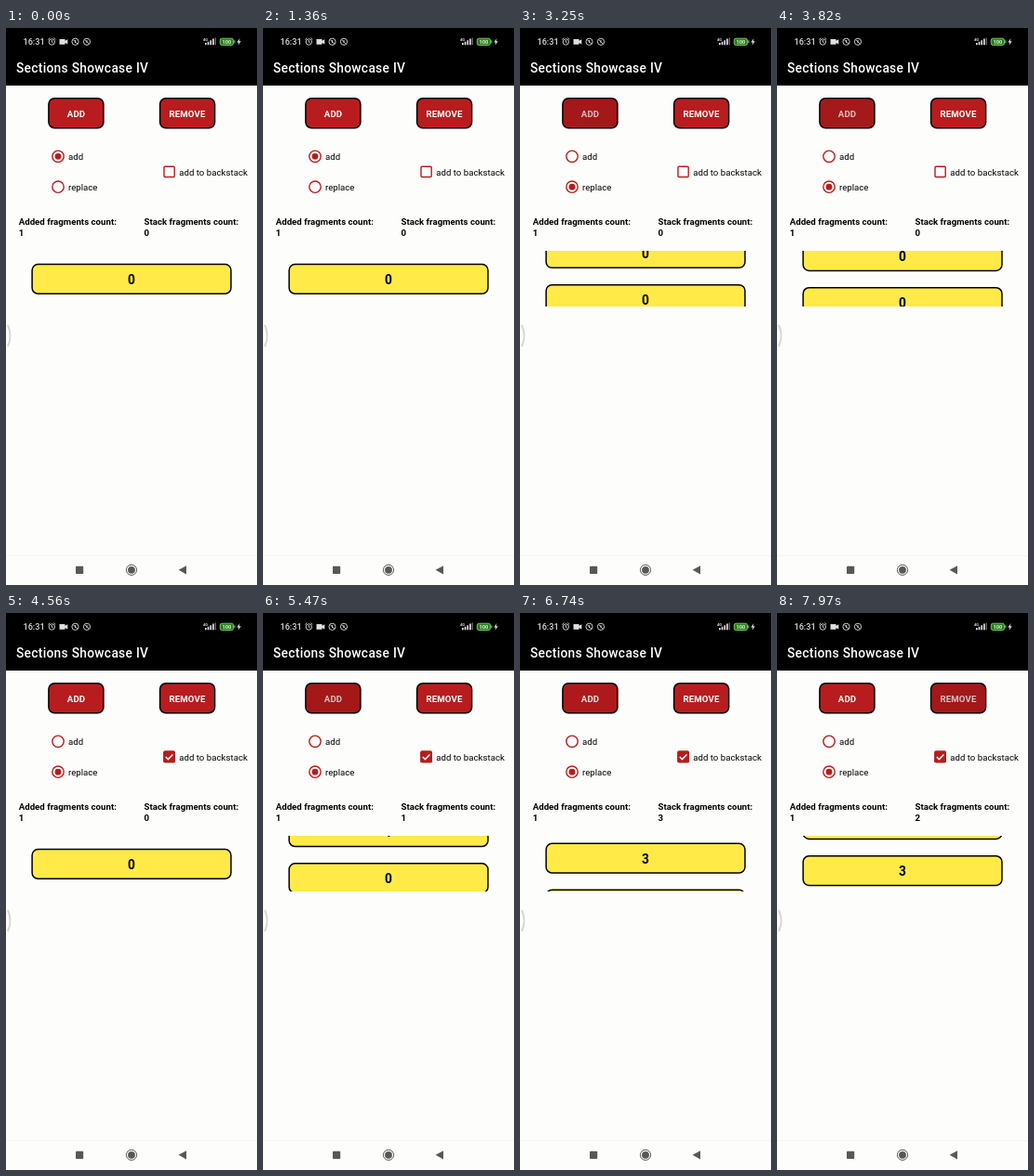
An HTML page for the animation above (8000 ms loop, 270 by 600 pixels).

```html
<!DOCTYPE html>
<html lang="en">
<head>
<meta charset="utf-8">
<title>Sections Showcase IV</title>
<style>
html, body { margin: 0; width: 100%; height: 100%; overflow: hidden; background: #fdfdfc; }
svg { display: block; width: 100%; height: 100%; font-family: Roboto, "Noto Sans", sans-serif; font-size: 9.65px; }
.bold { font-weight: 700; }
.mid { text-anchor: middle; }
.button rect { fill: #b91c1e; stroke: #000; stroke-width: 1.5; }
.button text { fill: #fff; letter-spacing: .15px; }
.button .ripple { fill: #6b1010; stroke: none; }
.bar rect { fill: #ffea48; stroke: #000; stroke-width: 1.5; }
.bar text { font-size: 13.75px; }
.ring { fill: none; stroke: #b71c1c; stroke-width: 1.4; }
.dot { fill: #b71c1c; }
.line { fill: none; stroke: #ccc; stroke-width: 1; }
</style>
</head>
<body>
<svg viewBox="0 0 270 600" preserveAspectRatio="none">
  <defs><clipPath id="box"><rect y="240" width="270" height="60"/></clipPath></defs>
  <rect width="270" height="600" fill="#fdfdfc"/>
  <rect width="270" height="62" fill="#000"/>

  <!-- status bar -->
  <g fill="#dedede">
    <text x="18.5" y="18" font-size="9.1" font-weight="500">16:31</text>
    <g class="line">
      <circle cx="49.3" cy="15" r="3.2"/>
      <path d="M49.3 13v2.2l1.5 .9M45.3 12.5l2-1.9M53.3 12.5l-2-1.9"/>
      <circle cx="74.5" cy="14.8" r="3.6"/><path d="M72.3 12.6l4.4 4.4M74.5 13v3"/>
      <circle cx="87" cy="14.8" r="3.6"/><path d="M84.8 12.6l4.4 4.4M87 13v3"/>
    </g>
    <path d="M57.5 12h6v1.8l2.8-1.6v5.4l-2.8-1.6v1.8h-6z"/>
    <text x="212" y="13.5" font-size="4" font-weight="700">4G</text>
    <path d="M214 16h1.7v2.3H214zM216.7 14.7h1.7v3.6h-1.7zM219.4 13.2h1.7v5.1h-1.7zM222.1 11.6h1.7v6.7h-1.7z"/>
    <path d="M224.7 10.5h1.2v7.8h-1.2z" fill="#777"/>
    <rect x="230.3" y="11.2" width="14.2" height="7.3" rx="2" fill="#2c7a22" stroke="#6ccb4c"/>
    <path d="M245.2 13.3h1.2v3h-1.2z" fill="#6ccb4c"/>
    <text x="237.4" y="17" class="mid bold" font-size="5.8" fill="#d4f8c8">100</text>
    <path d="M251.5 11l-3.1 4.5h2l-.8 3.3 3.2-4.6h-2z"/>
  </g>
  <text x="11" y="48" font-size="13.75" font-weight="500" letter-spacing=".3" fill="#fff">Sections Showcase IV</text>

  <g class="button">
    <rect x="45.9" y="75.8" width="59" height="31.9" rx="6.3"/>
    <text x="75.5" y="95.5" class="mid bold">ADD</text>
    <rect id="addRipple" class="ripple" x="46.6" y="76.5" width="57.6" height="30.5" rx="5.6"/>
  </g>
  <g class="button">
    <rect x="165.6" y="75.8" width="59" height="31.9" rx="6.3"/>
    <text x="195" y="95.5" class="mid bold">REMOVE</text>
    <rect id="removeRipple" class="ripple" x="166.3" y="76.5" width="57.6" height="30.5" rx="5.6"/>
  </g>

  <circle class="ring" cx="56" cy="138.3" r="6.2"/>
  <circle id="addDot" class="dot" cx="56" cy="138.3"/>
  <text x="67" y="142">add</text>
  <circle class="ring" cx="56" cy="171.2" r="6.2"/>
  <circle id="replaceDot" class="dot" cx="56" cy="171.2"/>
  <text x="67" y="175">replace</text>

  <rect class="ring" x="170" y="149.3" width="11.2" height="11.2" rx="1"/>
  <g id="check">
    <rect class="dot" x="169.3" y="148.6" width="12.6" height="12.6" rx="1.5"/>
    <path d="M171.8 155l2.6 2.6 5-5.2" fill="none" stroke="#fff" stroke-width="1.5"/>
  </g>
  <text x="186.2" y="158.5" letter-spacing=".03">add to backstack</text>

  <g class="bold" letter-spacing=".03">
    <text x="13.7" y="212">Added fragments count:</text>
    <text x="13.7" y="223.5">1</text>
    <text x="148.5" y="212">Stack fragments count:</text>
    <text x="148.5" y="223.5" id="stack">0</text>
  </g>

  <g clip-path="url(#box)">
    <g id="oldBar" class="bar">
      <rect x="28.1" y="254.6" width="213.9" height="31.6" rx="6.3"/>
      <text x="135" y="276" class="mid bold">0</text>
    </g>
    <g id="newBar" class="bar">
      <rect x="28.1" y="254.6" width="213.9" height="31.6" rx="6.3"/>
      <text x="135" y="276" class="mid bold">0</text>
    </g>
  </g>

  <!-- edge handle and navigation -->
  <path d="M2 320Q7 331.5 2 343" fill="none" stroke="#d9d6cd" stroke-width="2"/>
  <path d="M0 568.5h270" stroke="#f5f5f0"/>
  <g fill="#585856">
    <rect x="75" y="579.8" width="8.2" height="8.2" rx=".8"/>
    <circle cx="135" cy="583.8" r="3.9"/>
    <circle cx="135" cy="583.8" r="5.6" fill="none" stroke="#585856"/>
    <path d="M185.6 583.8l8.4-4.6v9.2z"/>
  </g>
</svg>
<script>
const LOOP = 8000, SLIDE = 400, STEP = 50;
const REPLACE_AT = 1600, CHECK_AT = 4400;
// Each tap slides one fragment out and another in from above.
const taps = [
  { at: 2512, from: 0, to: 0, stack: 0 },
  { at: 3066, from: 0, to: 0, stack: 0 },
  { at: 3620, from: 0, to: 0, stack: 0 },
  { at: 5322, from: 0, to: 1, stack: 1 },
  { at: 5879, from: 1, to: 2, stack: 2 },
  { at: 6433, from: 2, to: 3, stack: 3 },
  { at: 7872, from: 3, to: 2, stack: 2, remove: true }
];
const idle = { at: -LOOP, from: 0, to: 0, stack: 0 };

const $ = id => document.getElementById(id);
const clamp = v => Math.min(1, Math.max(0, v));
const ease = p => (1 - Math.cos(Math.PI * p)) / 2;

function placeBar(id, value, y) {
  const bar = $(id);
  bar.setAttribute("transform", `translate(0 ${y})`);
  bar.querySelector("text").textContent = value;
}

// Pressed shade: quick rise, short hold, slow fade.
function ripple(t, remove) {
  const glows = taps.filter(tap => !!tap.remove === remove).map(tap => {
    const age = t - tap.at + 60;
    return Math.min(clamp(age / 60), clamp((480 - age) / 230));
  });
  return Math.max(...glows) * 0.27;
}

function draw(t) {
  const tap = taps.filter(s => s.at <= t).pop() || idle;
  const y = STEP * ease(clamp((t - tap.at) / SLIDE));
  placeBar("oldBar", tap.from, y);
  placeBar("newBar", tap.to, y - STEP);
  $("stack").textContent = tap.stack;

  const chosen = ease(clamp((t - REPLACE_AT) / 160));
  $("addDot").setAttribute("r", 3.4 * (1 - chosen));
  $("replaceDot").setAttribute("r", 3.4 * chosen);
  $("check").setAttribute("opacity", clamp((t - CHECK_AT) / 120));
  $("addRipple").setAttribute("opacity", ripple(t, false));
  $("removeRipple").setAttribute("opacity", ripple(t, true));
}

const start = performance.now();
function tick() {
  draw((performance.now() - start) % LOOP);
  requestAnimationFrame(tick);
}
tick();
</script>
</body>
</html>
```
